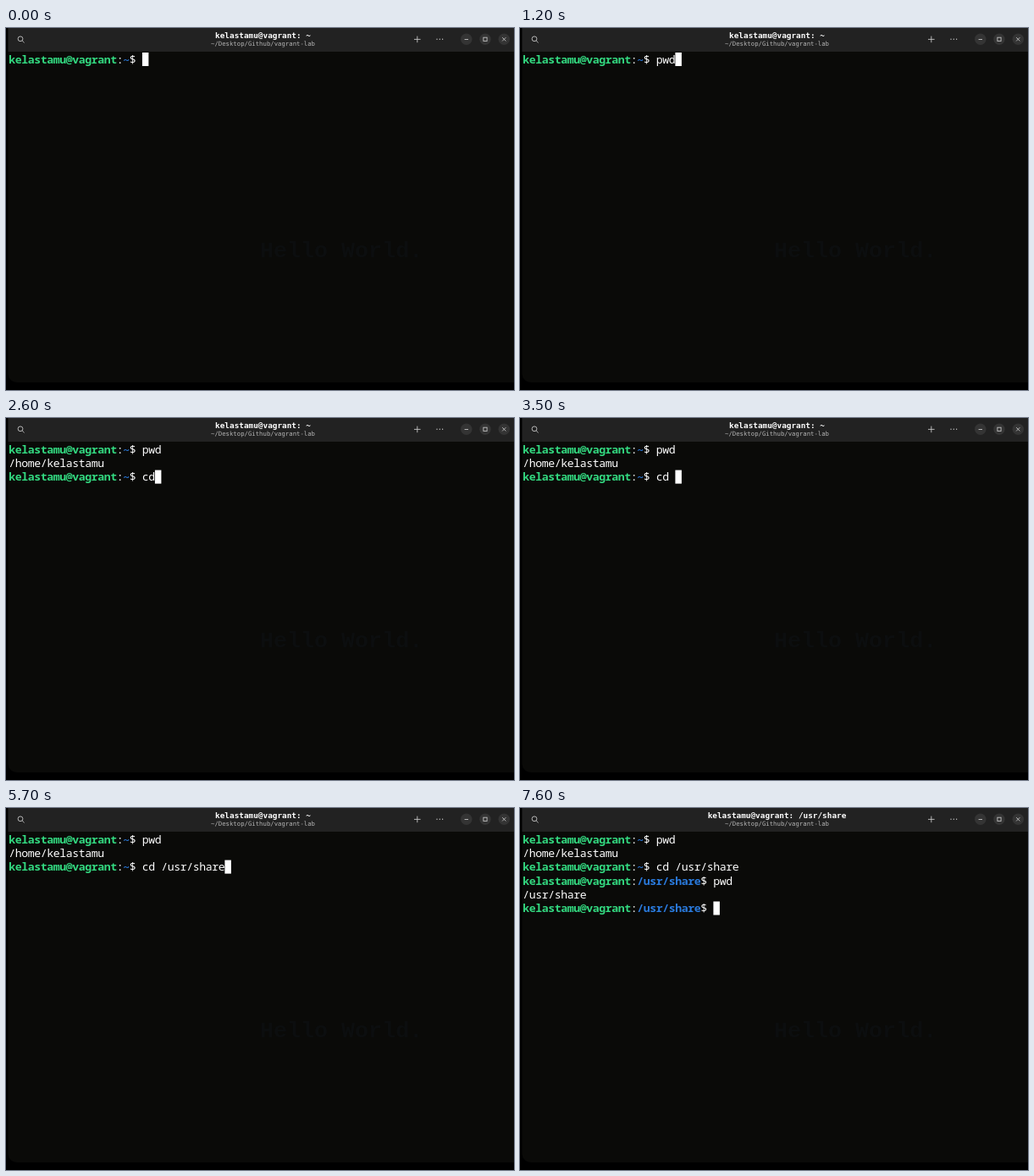
Recreate the animation shown at these times as an HTML page with a canvas. Size 600x428 px, loop 8000 ms.

```html
<!DOCTYPE html>
<html lang="en">
<head>
<meta charset="utf-8">
<title>Terminal</title>
<style>
  html, body { margin: 0; width: 100%; height: 100%; overflow: hidden; background: #000; }
  canvas { display: block; width: 600px; height: 428px; }
</style>
</head>
<body>
<canvas id="stage" width="600" height="428"></canvas>
<script>
const ctx = document.getElementById('stage').getContext('2d');
const LOOP = 8000;
const CELL = 7.5, ROW = 16.3, LEFT = 3.4, TOP = 29;
const GREEN = '#33d980', BLUE = '#2a7bde', WHITE = '#ffffff';
const MONO = '"Noto Sans Mono", "DejaVu Sans Mono", monospace';
const TITLE = '"DejaVu Sans Mono", monospace';
const USER = 'kelastamu@vagrant';

// Each command: working directory, keystrokes as [time, text so far], Enter time, output.
const commands = [
  { dir: '~', keys: [[800, 'p'], [1100, 'pw'], [1200, 'pwd']], enter: 1300, out: '/home/kelastamu' },
  { dir: '~', keys: [[2400, 'c'], [2600, 'cd'], [2900, 'cd '], [3600, 'cd /'], [3900, 'cd /u'],
      [4000, 'cd /usr/'], [4900, 'cd /usr/s'], [5100, 'cd /usr/sh'], [5200, 'cd /usr/sha'],
      [5400, 'cd /usr/shar'], [5700, 'cd /usr/share']], enter: 6100 },
  { dir: '/usr/share', keys: [[7000, 'p'], [7100, 'pw'], [7400, 'pwd']], enter: 7600, out: '/usr/share' },
  { dir: '/usr/share', keys: [], enter: Infinity }
];

// Intervals in which the blinking cursor is dark.
const dark = [[100, 600], [1800, 2300], [4600, 4900], [6700, 7000]];

// Writes text on the terminal's character grid and returns the next column.
function write(text, col, row, color, weight = 500) {
  ctx.font = weight + ' 13.2px ' + MONO;
  ctx.fillStyle = color;
  ctx.textAlign = 'center';
  for (const ch of text) {
    ctx.fillText(ch, LEFT + (col + 0.5) * CELL, TOP + 12.8 + row * ROW);
    col++;
  }
  return col;
}

function prompt(dir, row) {
  let col = write(USER, 0, row, GREEN, 600);
  col = write(':', col, row, WHITE);
  col = write(dir, col, row, BLUE, 600);
  return write('$ ', col, row, WHITE);
}

function line(...points) {
  ctx.beginPath();
  points.forEach(([x, y], i) => i ? ctx.lineTo(x, y) : ctx.moveTo(x, y));
  ctx.stroke();
}

function disc(x, y, r, color) {
  ctx.fillStyle = color;
  ctx.beginPath();
  ctx.arc(x, y, r, 0, 7);
  ctx.fill();
}

function drawWindow() {
  ctx.fillStyle = '#000';
  ctx.fillRect(0, 0, 600, 428);
  ctx.fillStyle = '#0a0a08';
  ctx.beginPath();
  ctx.roundRect(2.5, -20, 620, 439, 10);
  ctx.fill();

  ctx.font = 'bold 26.7px "Liberation Mono", monospace';
  ctx.textAlign = 'left';
  ctx.fillStyle = '#0c0e0f';
  ctx.fillText('Hello World.', 300, 271);
}

function drawHeader(dir) {
  ctx.fillStyle = '#222222';
  ctx.fillRect(2.5, 0, 598, 28);

  ctx.textAlign = 'center';
  ctx.fillStyle = '#ffffff';
  ctx.font = 'bold 9.4px ' + TITLE;
  ctx.fillText(USER + ': ' + dir, 303.5, 12);
  ctx.fillStyle = '#b4b4b4';
  ctx.font = '7.3px ' + TITLE;
  ctx.fillText('~/Desktop/Github/vagrant-lab', 303.5, 21);

  ctx.strokeStyle = '#c4c4c4';
  ctx.lineWidth = 0.9;
  ctx.beginPath();
  ctx.arc(17, 12.8, 2.9, 0, 7);
  ctx.stroke();
  line([19.2, 15], [21.6, 17.4]);
  line([482, 13.4], [489.6, 13.4]);
  line([485.8, 9.6], [485.8, 17.2]);
  for (const x of [509, 512.3, 515.6]) disc(x, 13.3, 0.7, '#c4c4c4');

  for (const x of [543.8, 566, 588.3]) disc(x, 13.3, 6.7, '#343434');
  line([541.6, 13.5], [546, 13.5]);
  ctx.strokeRect(563.9, 11.2, 4.2, 4.2);
  line([586.2, 11.2], [590.4, 15.4]);
  line([590.4, 11.2], [586.2, 15.4]);
}

function drawSession(t) {
  let row = 0;
  for (const cmd of commands) {
    const typed = cmd.keys.filter(([at]) => at <= t).pop();
    const col = write(typed ? typed[1] : '', prompt(cmd.dir, row), row, WHITE);
    if (t < cmd.enter) {
      if (!dark.some(([from, to]) => t >= from && t < to)) {
        ctx.fillStyle = WHITE;
        ctx.fillRect(LEFT + col * CELL, TOP + row * ROW, CELL, 16);
      }
      return;
    }
    row++;
    if (cmd.out) write(cmd.out, 0, row++, WHITE);
  }
}

function draw(now) {
  const t = now % LOOP;
  drawWindow();
  drawHeader(commands.find(cmd => t < cmd.enter).dir);
  drawSession(t);
}

const start = performance.now();
function frame() {
  draw(performance.now() - start);
  requestAnimationFrame(frame);
}
frame();
</script>
</body>
</html>
```
